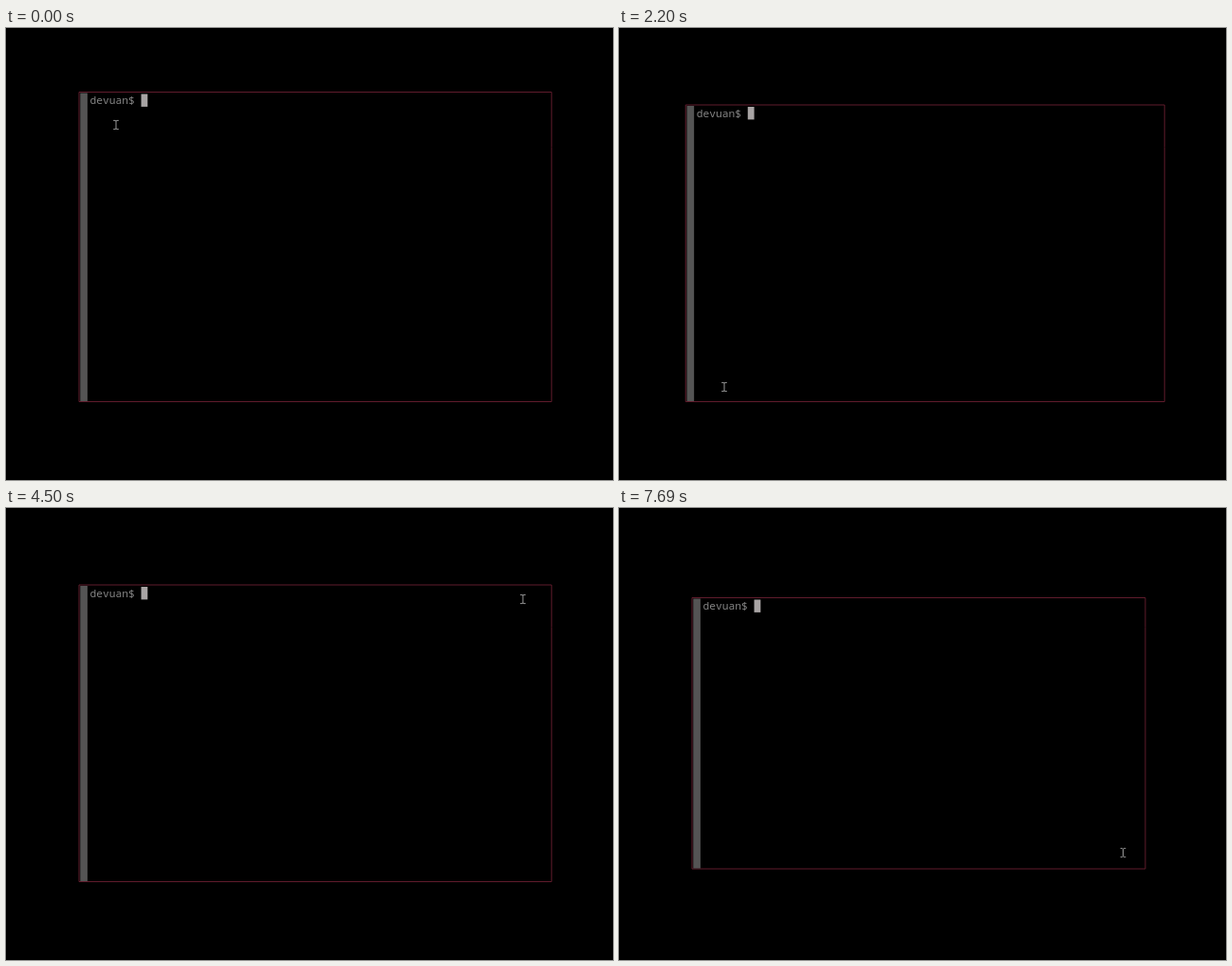
An HTML page that plays this animation: 640 by 476 pixels, repeating every 7880 ms.

```html
<!DOCTYPE html>
<html lang="en">
<head>
<meta charset="utf-8">
<title>Terminal resize</title>
<style>
  html, body { margin: 0; width: 100%; height: 100%; overflow: hidden; background: #000; }
  svg { display: block; width: 100vw; height: 100vh; }
  .prompt { font: 300 11.25px "Noto Sans Mono", "Liberation Mono", monospace; fill: #858585; white-space: pre; }
  .size { font: 8.5px "DejaVu Sans", sans-serif; fill: #dcebf2; }
</style>
</head>
<body>
<svg viewBox="0 0 640 476">
  <rect width="640" height="476"/>
  <path id="border" fill="none" stroke="#601c2c"/>
  <g id="win">
    <rect id="bar" x="1.3" y="1" width="7.6" fill="#545454"/>
    <text class="prompt" x="11.4" y="12.5">devuan$</text>
    <rect x="65.5" y="2" width="6.8" height="13.4" fill="#a8a4a4"/>
    <g id="label">
      <rect x=".5" y=".5" width="42.5" height="11" fill="#0b1620"/>
      <text id="size" class="size" x="5.8" y="9.5"></text>
    </g>
  </g>
  <path id="beam" d="M-2.8-4.6H-1L0-4 1-4.6H2.8M0-4V4M-2.8 4.6H-1L0 4 1 4.6H2.8" fill="none" stroke="#999"/>
  <g id="arrow" fill="#fff" stroke="#fff">
    <path d="M.5 9.5V.5H10" fill="none" stroke-width="1.5"/>
    <path d="M3.3 3.3H8.1L3.3 8.1Z" stroke="none"/>
    <path d="M5 5L9.3 9.3" stroke-width="1.9"/>
  </g>
</svg>
<script>
const LOOP = 7880, LAST = 7690, STEP = 100;
const CW = 6.75, CH = 13.5, LEFT = 77, TOP = 67.5;
const $ = id => document.getElementById(id);

// Each drag pulls one corner (signs sx, sy) inward and lets it back.
// Points are step, x, y of the pointer.
const drags = [
  { sx: -1, sy: -1, from: [3, 116, 102], via: [11, 134.8, 121], to: [16, 109.2, 115] },
  { sx: -1, sy: 1, from: [26, 111, 378], via: [33, 136.3, 364.45], to: [36, 117.5, 378] },
  { sx: 1, sy: -1, from: [48, 545, 96], via: [54, 531, 98], to: [58, 541, 98.5] },
  { sx: 1, sy: 1, from: [67, 538.5, 363.5], via: [75, 512, 351], to: [77, 531.5, 363] }
];
const TRAVEL = [5, 8, 5];  // steps the pointer takes to reach the next corner
const BOW = 0.07;          // sideways bend of that path

const easeOut = k => Math.sin(k * Math.PI / 2);
const easeBoth = k => (1 - Math.cos(k * Math.PI)) / 2;

function between([n0, x0, y0], [n1, x1, y1], n, ease, bow = 0) {
  const k = Math.min(1, Math.max(0, (n - n0) / (n1 - n0)));
  const e = ease(k), side = bow * Math.sin(Math.PI * k);
  const dx = x1 - x0, dy = y1 - y0;
  return [x0 + dx * e + dy * side, y0 + dy * e - dx * side];
}

function pull({ from, via, to }, n) {
  return n <= via[0] ? between(from, via, n, easeOut) : between(via, to, n, easeOut);
}

function travel(i, n) {
  const [end, x, y] = drags[i].to, next = drags[i + 1].from;
  const start = end + 1;
  return between([start, x, y], [start + TRAVEL[i], next[1], next[2]], n, easeBoth, BOW);
}

// Window in cells: left, top, right, bottom. Edges snap to whole cells.
function resize(box, drag, n) {
  const { sx, sy, from } = drag;
  const [x, y] = pull(drag, n);
  const out = box.slice();
  out[sx < 0 ? 0 : 2] -= sx * Math.ceil(sx * (from[1] - x) / CW);
  out[sy < 0 ? 1 : 3] -= sy * Math.ceil(sy * (from[2] - y) / CH);
  return out;
}

const edges = ([l, t, r, b]) =>
  [LEFT + CW * l, TOP + CH * t, LEFT + 12.2 + CW * r, TOP + 2 + CH * b];
const show = (el, on) => el.setAttribute("display", on ? "inline" : "none");
const place = (el, x, y, more = "") => el.setAttribute("transform", `translate(${x} ${y})${more}`);

function draw(ms) {
  const n = ms >= LAST ? 77 : Math.min(75, Math.floor(ms / STEP));
  const past = drags.filter(d => n >= d.to[0]);
  const rest = past.reduce((box, d) => resize(box, d, d.to[0]), [0, 0, 72, 24]);
  const drag = drags[past.length];
  const active = drag && n >= drag.from[0] - 1;
  const at = m => edges(active ? resize(rest, drag, m) : rest);
  const [l, t, r, b] = at(n);
  // a growing right edge is repainted from the top down
  const lower = Math.min(r, at(n - 1)[2]);

  $("border").setAttribute("d", `M${l} ${t}H${r}V125.5M${lower} 125.5V${b}H${l}V${t}`);
  place($("win"), l, t);
  $("bar").setAttribute("height", b - t - 1.5);
  show($("label"), active);
  show($("arrow"), active);
  show($("beam"), !active);

  if (active) {
    // the size label trails slightly
    const s = resize(rest, drag, n - 0.5);
    $("size").textContent = `${s[2] - s[0]} x ${s[3] - s[1]}`;
    place($("arrow"), ...pull(drag, n), ` scale(${-drag.sx} ${-drag.sy})`);
  } else {
    const i = past.length - 1;
    const [x, y] = i < 0 ? pull(drag, n) : drag ? travel(i, n) : pull(drags[i], n);
    place($("beam"), x, y);
  }
}

const begin = performance.now();
function tick() {
  draw((performance.now() - begin) % LOOP);
  requestAnimationFrame(tick);
}
tick();
</script>
</body>
</html>
```
